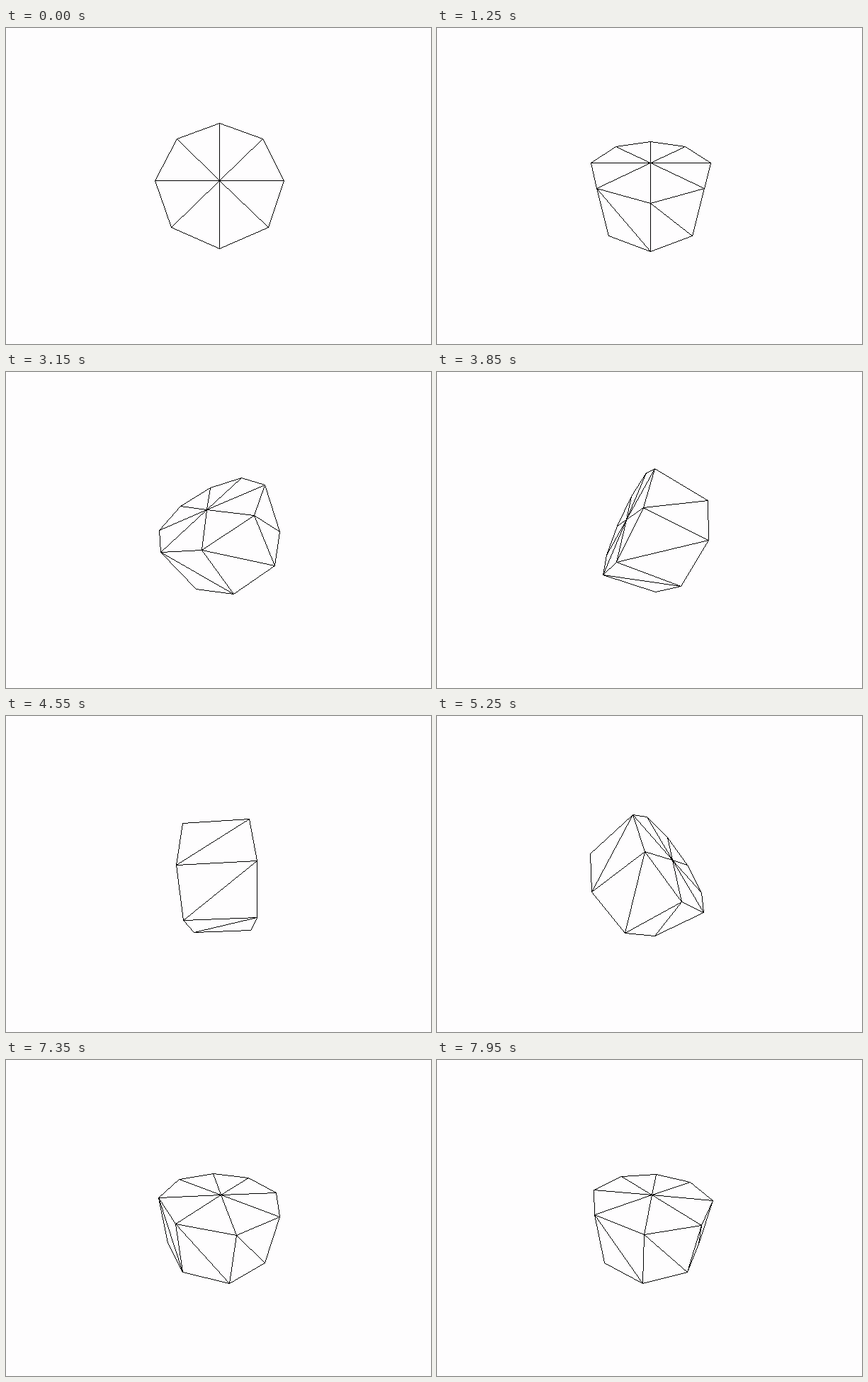
Animation, 600 px wide and 446 px high, one loop 8 s. Source, as an HTML page with a canvas:

```html
<!DOCTYPE html>
<html lang="en">
<head>
<meta charset="utf-8">
<title>Rotating wireframe prism</title>
<style>
html, body { margin: 0; width: 100%; height: 100%; overflow: hidden; background: #fefdfe; }
canvas { display: block; }
</style>
</head>
<body>
<canvas id="stage" width="600" height="446"></canvas>
<script>
const LOOP = 8000, TICK = 50, REPEAT = 1000 / 15;
const SIDES = 8, HALF = 0.5;
const CX = 301.85, CY = 224.75, FOCAL = 222.8, DIST = 2.94;
const RAD = Math.PI / 180;
const ctx = document.getElementById('stage').getContext('2d');

// Roll in degrees after a number of key repeats
const ROLL = [[0, 0], [8, 25.6], [19, 60.3], [40, 129.9], [53, 173.9], [55, 180.4]];

// Key repeats fired since start, seen on the tick grid
function repeats(t, start, max) {
  const n = Math.floor((t + TICK / 2 - start) / REPEAT) + 1;
  return Math.max(0, Math.min(max, n));
}

function along(keys, n) {
  let i = 1;
  while (i < keys.length - 1 && n > keys[i][0]) i++;
  const [a, va] = keys[i - 1], [b, vb] = keys[i];
  return va + (vb - va) * (n - a) / (b - a);
}

function pose(t) {
  const tilt = 12 + 41.8 / 12 * repeats(t, 530, 12);
  const rolls = (t >= 2050 ? 1 : 0) + repeats(t, 2730, 54);
  const roll = along(ROLL, rolls) - (t >= 6450 ? 3.1 : 0);
  const spin = -3.28 * ((t >= 6600 ? 1 : 0) + repeats(t, 7265, 11));
  return { tilt: tilt * RAD, roll: roll * RAD, spin: spin * RAD };
}

function project(x, y, z, { tilt, roll }) {
  const x1 = x * Math.cos(roll) - y * Math.sin(roll);
  const y1 = x * Math.sin(roll) + y * Math.cos(roll);
  const y2 = y1 * Math.sin(tilt) - z * Math.cos(tilt);
  const z2 = y1 * Math.cos(tilt) + z * Math.sin(tilt);
  const s = FOCAL / (DIST - z2);
  return [CX + x1 * s, CY - y2 * s];
}

function ring(y, p) {
  return Array.from({ length: SIDES }, (_, i) => {
    const a = i * 2 * Math.PI / SIDES + p.spin;
    return project(Math.sin(a), y, Math.cos(a), p);
  });
}

const facing = ([a, b, c]) =>
  (b[0] - a[0]) * (c[1] - a[1]) - (b[1] - a[1]) * (c[0] - a[0]) < 0;

// Hard line, one pixel per step
function line(a, b) {
  const [x, y] = a.map(Math.floor), [x2, y2] = b.map(Math.floor);
  const n = Math.max(Math.abs(x2 - x), Math.abs(y2 - y), 1);
  for (let k = 0; k <= n; k++) {
    ctx.fillRect(Math.round(x + (x2 - x) * k / n), Math.round(y + (y2 - y) * k / n), 1, 1);
  }
}

function draw(t) {
  const p = pose(Math.floor(t / TICK) * TICK);
  const top = ring(HALF, p), low = ring(-HALF, p);
  const topMid = project(0, HALF, 0, p), lowMid = project(0, -HALF, 0, p);
  const tris = [];
  for (let i = 0; i < SIDES; i++) {
    const j = (i + 1) % SIDES;
    tris.push([topMid, top[i], top[j]], [lowMid, low[j], low[i]],
      [top[i], low[i], low[j]], [top[i], low[j], top[j]]);
  }
  ctx.fillStyle = '#fefdfe';
  ctx.fillRect(0, 0, 600, 446);
  ctx.fillStyle = '#000';
  for (const [a, b, c] of tris.filter(facing)) {
    line(a, b);
    line(b, c);
    line(c, a);
  }
}

const begin = performance.now();
function loop() {
  draw((performance.now() - begin) % LOOP);
  requestAnimationFrame(loop);
}
draw(0);
requestAnimationFrame(loop);
</script>
</body>
</html>
```
